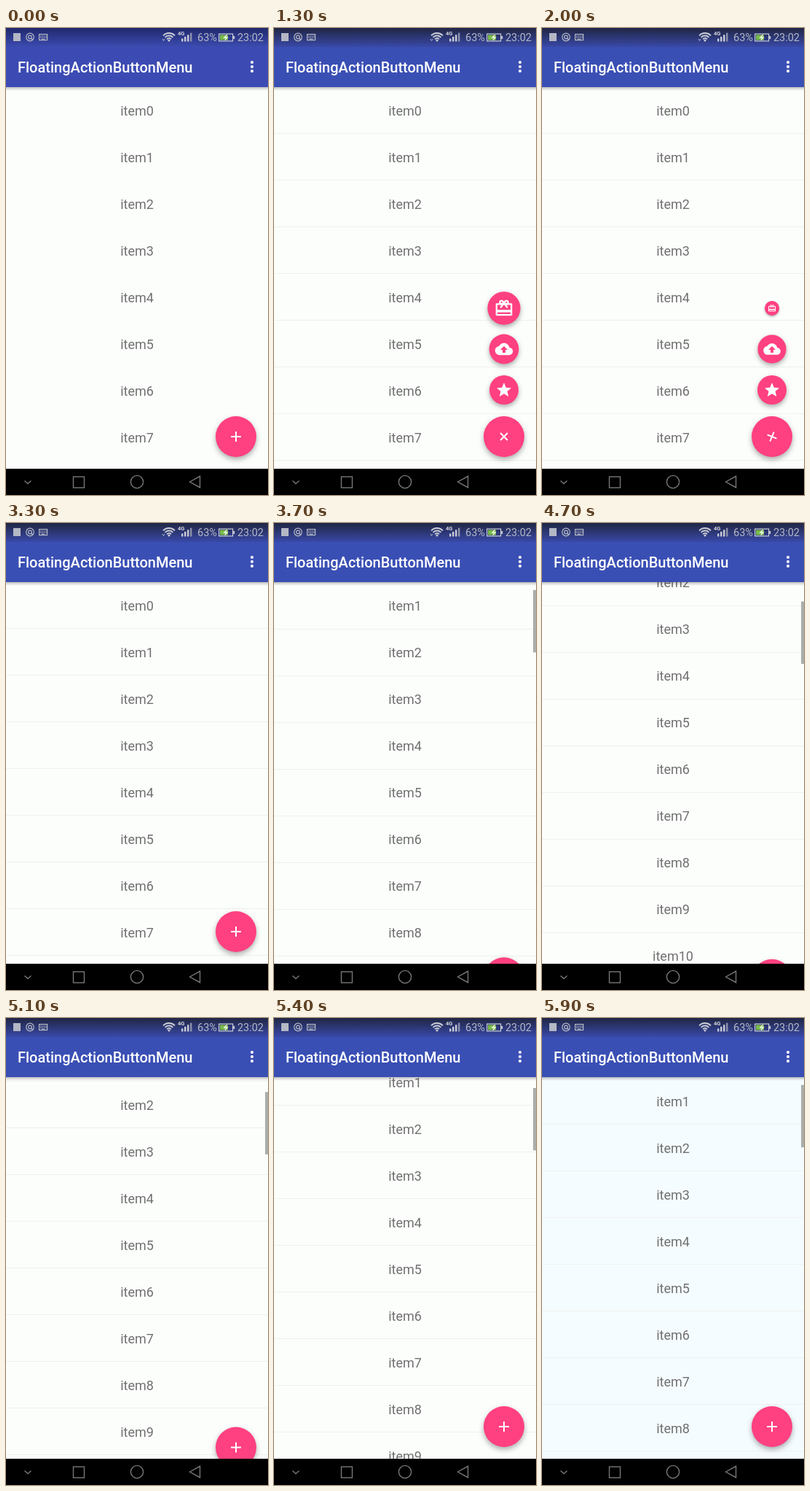
An HTML page with a canvas that plays this animation: 360 by 640 pixels, repeating every 6000 ms.

```html
<!DOCTYPE html>
<html lang="en">
<head>
<meta charset="utf-8">
<title>FloatingActionButtonMenu</title>
<style>
  html, body { margin: 0; width: 100%; height: 100%; overflow: hidden; background: #000; }
  canvas { display: block; width: 360px; height: 640px; }
</style>
</head>
<body>
<canvas id="stage" width="360" height="640"></canvas>
<script>
const ctx = document.getElementById('stage').getContext('2d');
const LOOP = 6000, TICK = 100;
const PINK = '#ff4081', GREY = '#b4b8c4';
const ROW = 64, TOP = 81, BOTTOM = 604, PEAK = 165.5, REST = 63, HIDE = 72;

const clamp = (v, a, b) => Math.min(b, Math.max(a, v));
const part = (t, start, length) => clamp((t - start) / length, 0, 1);
const smooth = p => p * p * (3 - 2 * p);
const overshoot = p => p <= 0 ? 0 : 1 + (p - 1) ** 2 * (3 * (p - 1) + 2);

function rect(x, y, w, h, color) {
  ctx.fillStyle = color;
  ctx.fillRect(x, y, w, h);
}

function disc(x, y, r, color) {
  ctx.fillStyle = color;
  ctx.beginPath();
  ctx.arc(x, y, r, 0, Math.PI * 2);
  ctx.fill();
}

function ring(x, y, r, a = 0, b = Math.PI * 2) {
  ctx.beginPath();
  ctx.arc(x, y, r, a, b);
  ctx.stroke();
}

function line(points, close) {
  ctx.beginPath();
  points.forEach(([x, y]) => ctx.lineTo(x, y));
  if (close) ctx.closePath();
  ctx.stroke();
}

function pen(color, width) {
  ctx.strokeStyle = color;
  ctx.lineWidth = width;
}

function text(str, x, y, size, color, weight = 400, align = 'left') {
  ctx.font = `${weight} ${size}px Roboto, sans-serif`;
  ctx.textAlign = align;
  ctx.fillStyle = color;
  ctx.fillText(str, x, y);
}

function fade(y0, y1, from, to) {
  const g = ctx.createLinearGradient(0, y0, 0, y1);
  g.addColorStop(0, from);
  g.addColorStop(1, to);
  return g;
}

// Menu icons live on a 24 x 24 grid
const star = new Path2D('M12 17.27L18.18 21l-1.64-7.03L22 9.24l-7.19-.61L12 2 9.19 8.63 2 9.24l5.46 4.73L5.82 21z');
const cloud = new Path2D('M19.35 10.04C18.67 6.59 15.64 4 12 4 9.11 4 6.6 5.64 5.35 8.04 2.34 8.36 0 10.91 0 14c0 3.31 2.69 6 6 6h13c2.76 0 5-2.24 5-5 0-2.64-2.05-4.78-4.65-4.96zM14 13v4h-4v-4H7l5-5 5 5h-3z');

function fillIcon(path) {
  ctx.fillStyle = '#fff';
  ctx.fill(path);
}

function gift() {
  pen('#fff', 2);
  ctx.lineJoin = 'round';
  ctx.strokeRect(3, 7, 18, 13);
  ctx.lineJoin = 'miter';
  rect(3, 14, 18, 3, '#fff');
  ring(9, 5, 2);
  ring(15, 5, 2);
  line([[7.8, 11.4], [12, 5.7], [16.2, 11.4]]);
}

const minis = [
  { y: 496, icon: () => fillIcon(star) },
  { y: 440, icon: () => fillIcon(cloud) },
  { y: 384, icon: gift }
];

function button(x, y, r, blur) {
  ctx.save();
  ctx.shadowColor = 'rgba(0,0,0,.32)';
  ctx.shadowBlur = blur;
  ctx.shadowOffsetY = blur / 2;
  disc(x, y, r, PINK);
  ctx.restore();
}

function drawMini(mini, i, t) {
  const open = overshoot(part(t, 933 + i * 100, 300));
  const shut = smooth(part(t, 1850 + (2 - i) * 125, 300));
  const k = open * (1 - shut);
  if (k < 0.01) return;
  button(316, mini.y, 20 * k, 6 * k);
  ctx.save();
  ctx.translate(316, mini.y);
  ctx.scale(k, k);
  ctx.translate(-12, -12);
  mini.icon();
  ctx.restore();
}

function drawFab(t, drop) {
  const turn = smooth(part(t, 850, 300)) - smooth(part(t, 1850, 300));
  button(316, 560 + drop, 28, 7);
  ctx.save();
  ctx.translate(316, 560 + drop);
  ctx.rotate(turn * Math.PI / 4);
  rect(-7, -1, 14, 2, '#fff');
  rect(-1, -7, 2, 14, '#fff');
  ctx.restore();
}

function drawList(scroll, t) {
  rect(0, TOP, 360, BOTTOM - TOP, t >= 5600 ? '#f5fcff' : '#fcfefc');
  const first = Math.floor(scroll / ROW);
  for (let i = first; i < first + 10; i++) {
    const y = TOP + i * ROW - scroll;
    text('item' + i, 180, y + 38.5, 18, '#707070', 400, 'center');
    if (t >= 200) rect(0, Math.round(y + 63), 360, 1, '#eff1ef');
  }
  if (scroll > 0) rect(356, TOP + 0.5 + scroll * 0.1634, 4, 85.5, '#acaeac');
}

function drawStatus(t) {
  rect(0, 0, 360, 26, t < 200 ? fade(0, 26, '#20296c', '#3c4bb0') : fade(0, 26, '#202644', '#3949a8'));

  rect(10, 7, 10, 11, GREY);

  pen(GREY, 1.2);
  ring(33, 12.5, 5.3);
  ring(33, 12.5, 2.3);
  line([[34.5, 14], [37, 16.5]]);

  ctx.strokeRect(45.6, 8.6, 11, 8);
  for (let i = 0; i < 4; i++) {
    rect(47 + i * 2.4, 10.5, 1.4, 1.2, GREY);
    rect(47 + i * 2.4, 12.7, 1.4, 1.2, GREY);
  }
  rect(48.5, 14.8, 5, 1, GREY);

  pen('#c9ccd5', 1.8);
  [4, 7.5, 11].forEach(r => ring(224, 18, r, -Math.PI * 0.76, -Math.PI * 0.24));
  disc(224, 17, 1.6, '#c9ccd5');
  if (t < 4700) {
    pen(GREY, 1);
    line([[215, 15], [216.5, 17.5], [218, 15]]);
  }

  text('4G', 236, 10, 7.5, '#d4d6de', 700);
  for (let i = 0; i < 4; i++) {
    const h = 4 + i * 2.6;
    rect(241 + i * 4, 18.5 - h, 2.4, h, i < 3 ? '#c9ccd5' : '#8d92ab');
  }

  text('63%', 263, 18, 14.5, GREY);
  pen('#c9ccd5', 1.2);
  ctx.strokeRect(292.6, 8.1, 19, 9.8);
  rect(312.2, 11, 2, 4, '#c9ccd5');
  rect(294, 9.5, 11, 7, '#79b94c');
  pen('#f4f8ea', 1.3);
  line([[303.5, 9.5], [300, 13], [304, 13], [300.8, 16.5]]);
  text('23:02', 354, 18, 14.5, GREY, 400, 'right');
}

function drawHeader(t) {
  rect(0, TOP, 360, 5, fade(TOP, TOP + 5, 'rgba(0,0,0,.24)', 'rgba(0,0,0,0)'));
  rect(0, 26, 360, TOP - 26, t < 200 ? '#3c4bb3' : '#3a4fb4');
  drawStatus(t);
  text('FloatingActionButtonMenu', 16, 61, 20, '#fff', 500);
  [47, 53, 59].forEach(y => disc(338, y, 2.1, '#fff'));
}

function drawNav() {
  rect(0, BOTTOM, 360, 36, '#000');
  pen('#777', 1.4);
  line([[25.5, 620.5], [30, 624.5], [34.5, 620.5]]);
  ctx.strokeRect(92.5, 615, 15, 15);
  ring(180, 622, 8.6);
  line([[252.5, 622], [266.5, 614.3], [266.5, 629.7]], true);
}

function draw(t) {
  const up = smooth(part(t, 3300, 950));
  const down = smooth(part(t, 4500, 1335));
  const scroll = PEAK * up - (PEAK - REST) * down;
  const drop = t < 4500 ? Math.min(scroll, HIDE) : clamp(scroll - PEAK + HIDE, 0, HIDE);

  drawList(scroll, t);
  minis.forEach((m, i) => drawMini(m, i, t));
  drawFab(t, drop);
  drawHeader(t);
  drawNav();
}

const begin = performance.now();
function loop() {
  const t = (performance.now() - begin) % LOOP;
  draw(Math.floor(t / TICK) * TICK);
  requestAnimationFrame(loop);
}
loop();
</script>
</body>
</html>
```
